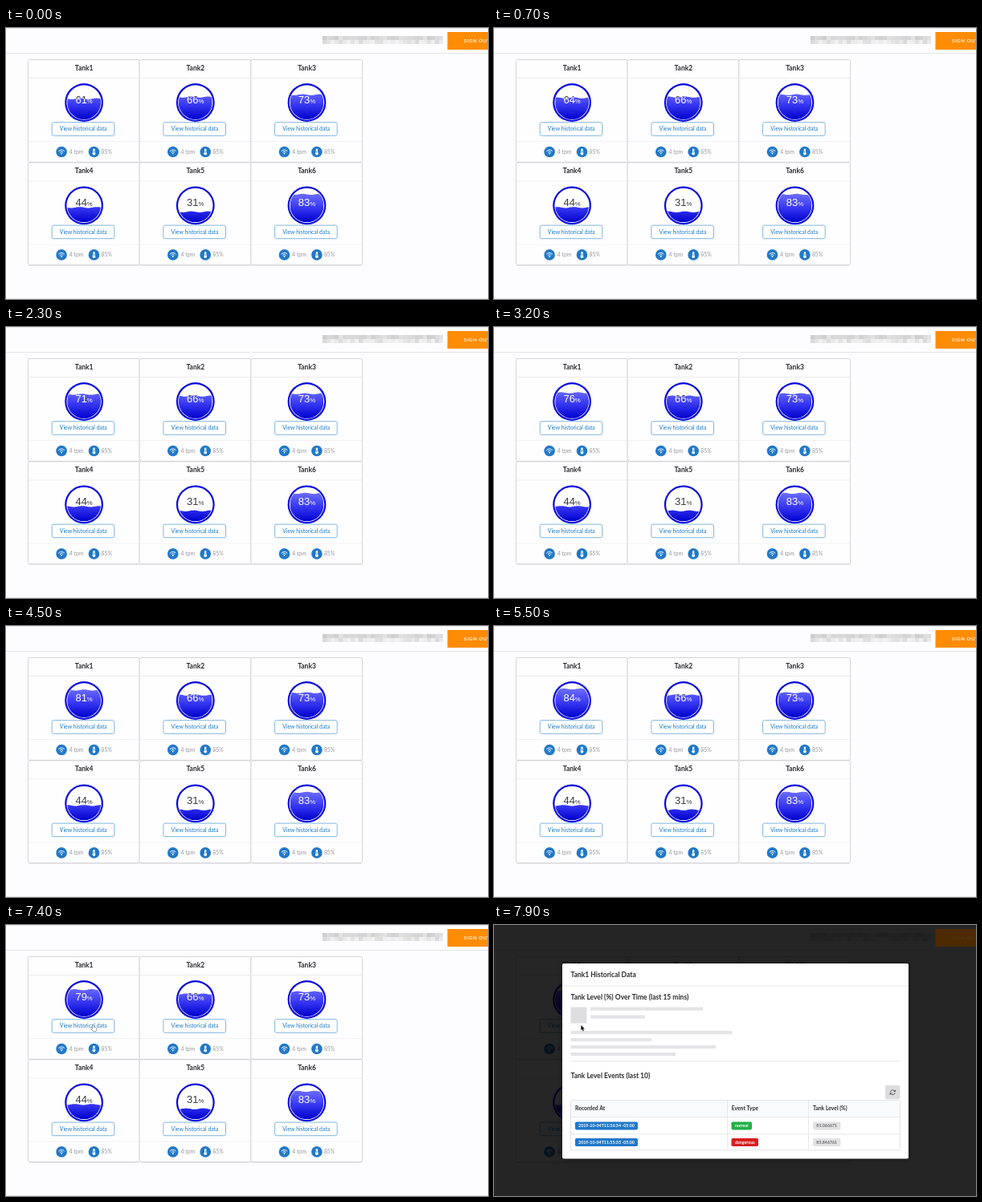
Recreate the animation shown at these times as an HTML page with a canvas. Size 600x338 px, loop 8000 ms.

```html
<!DOCTYPE html>
<html lang="en">
<head>
<meta charset="utf-8">
<title>Tank dashboard</title>
<style>
  html, body { margin: 0; width: 100%; height: 100%; overflow: hidden; background: #fdfcfe; }
  canvas { display: block; width: 600px; height: 338px; }
</style>
</head>
<body>
<canvas id="stage" width="600" height="338"></canvas>
<script>
const ctx = document.getElementById('stage').getContext('2d');
const LOOP = 8000, MODAL_AT = 7600;
const LATO = 'Lato, sans-serif', ARIAL = '"Liberation Sans", Arial, sans-serif';
const BLUE = '#2178c8', RED = '#d81e1e', INK = '#2b2b2d';
const COL = 138.7, ROW = 128.4;

const tanks = [0, 66, 73, 44, 31, 83];
const levelKeys = [[0, 61.3], [1500, 67.3], [3200, 76.2], [4500, 81.2], [6300, 87.3], [6500, 87.2], [7400, 79.3], [8000, 77]];

function track(keys, t) {
  for (let i = 1; i < keys.length; i++) {
    const [t0, a] = keys[i - 1], [t1, b] = keys[i];
    if (t <= t1) return a + (b - a) * Math.max(0, t - t0) / (t1 - t0);
  }
  return keys[keys.length - 1][1];
}

function rect(x, y, w, h, fill) {
  ctx.fillStyle = fill;
  ctx.fillRect(x, y, w, h);
}

function rounded(x, y, w, h, r, fill, stroke, lw = 1) {
  ctx.beginPath();
  ctx.roundRect(x, y, w, h, r);
  if (fill) { ctx.fillStyle = fill; ctx.fill(); }
  if (stroke) { ctx.strokeStyle = stroke; ctx.lineWidth = lw; ctx.stroke(); }
}

function disc(x, y, r, fill) {
  ctx.beginPath();
  ctx.arc(x, y, r, 0, Math.PI * 2);
  ctx.fillStyle = fill;
  ctx.fill();
}

function text(s, x, y, size, color, { weight = 400, align = 'left', family = LATO } = {}) {
  ctx.font = `${weight} ${size}px ${family}`;
  ctx.textAlign = align;
  ctx.textBaseline = 'alphabetic';
  ctx.fillStyle = color;
  ctx.fillText(s, x, y);
}

function percent(v, x, y, color) {
  const num = String(Math.floor(v));
  ctx.font = `13px ${ARIAL}`;
  const w = ctx.measureText(num).width;
  ctx.font = `7.8px ${ARIAL}`;
  const left = x - (w + ctx.measureText('%').width) / 2;
  text(num, left, y, 13, color, { family: ARIAL });
  text('%', left + w, y, 7.8, color, { family: ARIAL });
}

function gauge(x, y, v, danger, t) {
  const r = 21;
  disc(x, y, 23.9, danger ? '#e60d0d' : '#0808dc');
  disc(x, y, 21.7, '#fff');
  percent(v, x, y + 1, '#3c3c42');

  ctx.save();
  ctx.beginPath();
  ctx.arc(x, y, r, 0, Math.PI * 2);
  ctx.clip();
  const level = y + r - 2 * r * v / 100;
  ctx.beginPath();
  ctx.moveTo(x - r, y + r);
  for (let dx = -r; dx <= r; dx++) {
    ctx.lineTo(x + dx, level + 0.65 * Math.sin(2 * Math.PI * (dx / r - t / 2000)));
  }
  ctx.lineTo(x + r, y + r);
  ctx.closePath();
  ctx.clip();
  const g = ctx.createLinearGradient(0, y - r, 0, y + r);
  const stops = danger ? ['#ff8080', '#f83c3c', '#d40808'] : ['#8080ff', '#4040f8', '#0000cd'];
  stops.forEach((c, i) => g.addColorStop(i / 2, c));
  rect(x - r, y - r, 2 * r, 2 * r, g);
  percent(v, x, y + 1, '#fff');
  ctx.restore();
}

function wifi(x, y) {
  disc(x, y, 6.8, BLUE);
  ctx.strokeStyle = '#fff';
  ctx.lineWidth = 1;
  for (const r of [2.6, 4.8]) {
    ctx.beginPath();
    ctx.arc(x, y + 2.3, r, -Math.PI * 0.79, -Math.PI * 0.21);
    ctx.stroke();
  }
  disc(x, y + 2.1, 0.9, '#fff');
}

function thermometer(x, y, danger) {
  disc(x, y, 6.8, danger ? RED : BLUE);
  rounded(x - 1.2, y - 4, 2.4, 6, 1.2, '#fff');
  disc(x, y + 2.1, 1.9, '#fff');
  rect(x - 0.3, y - 1.5, 0.6, 3.2, danger ? RED : BLUE);
}

function card(i, v, t) {
  const x = 27.5 + (i % 3) * COL, y = 39.5 + Math.floor(i / 3) * ROW;
  const cx = x + 69.6, danger = v >= 85;
  rounded(x, y, COL, ROW - 0.4, 2, '#fefdff', '#d6d6da');
  rect(x + 1, y + 22.7, COL - 2, 0.7, '#e6e6ea');
  rect(x + 1, y + 101.7, COL - 2, 0.7, '#ececf0');
  rect(x + 1, y + ROW - 1, COL - 2, 0.8, '#cfcfd4');
  text('Tank' + (i + 1), cx, y + 13.5, 8.5, INK, { weight: 700, align: 'center' });
  gauge(cx, y + 53.5, v, danger, t);
  rounded(x + 29.7, y + 78.2, 77.6, 16.6, 2, '#fff', '#72afde', 0.9);
  text('View historical data', cx - 0.8, y + 88.9, 6.85, '#1678c8', { align: 'center' });
  wifi(x + 41.6, y + 115);
  text('4 tpm', x + 51.3, y + 117.5, 6.85, '#99999d');
  thermometer(x + 82, y + 115, danger);
  text('85%', x + 91, y + 117.5, 6.85, '#99999d');
}

// Mosaic strip hiding the account label
function mosaic() {
  let seed = 11;
  const rand = () => (seed = (seed * 16807) % 2147483647) / 2147483647;
  for (let row = 0; row < 2; row++) {
    for (let x = 394; x < 540; x += 5) {
      const c = Math.round((row ? 218 : 206) + rand() * 24);
      rect(x, 10 + row * 5, 5, 5, `rgb(${c},${c},${c})`);
    }
  }
}

function page(t) {
  rect(0, 0, 600, 338, '#fdfcfe');
  rect(0, 0, 600, 1, '#e8e8ea');
  rect(0, 31, 600, 1, '#e4e4e7');
  rect(0, 337, 600, 1, '#e8e8ea');
  mosaic();
  rect(549.5, 5, 51, 22, '#ff8c05');
  ctx.letterSpacing = '0.6px';
  text('SIGN OUT', 570, 18.2, 6, '#fff', { weight: 700 });
  ctx.letterSpacing = '0px';
  const live = track(levelKeys, t);
  tanks.forEach((v, i) => card(i, i ? v + 0.3 : live, t));
}

function label(s, x, y, w, fill, color = '#fff') {
  rounded(x, y, w, 10, 1.8, fill);
  text(s, x + w / 2, y + 6.9, 5.3, color, { weight: 700, align: 'center' });
}

function refreshIcon(x, y) {
  ctx.strokeStyle = ctx.fillStyle = '#555';
  ctx.lineWidth = 0.9;
  for (const turn of [0, Math.PI]) {
    ctx.save();
    ctx.translate(x, y);
    ctx.rotate(turn);
    ctx.beginPath();
    ctx.arc(0, 0, 2.9, Math.PI * 1.05, Math.PI * 1.8);
    ctx.stroke();
    ctx.beginPath();
    ctx.moveTo(3.6, -3.5);
    ctx.lineTo(3.6, -0.6);
    ctx.lineTo(0.7, -0.6);
    ctx.fill();
    ctx.restore();
  }
}

function modal() {
  rect(0, 0, 600, 338, 'rgba(0,0,0,0.85)');
  rect(549.5, 5, 51, 22, 'rgba(255,140,5,0.18)');
  ctx.save();
  ctx.shadowColor = 'rgba(0,0,0,0.4)';
  ctx.shadowBlur = 6;
  rounded(85, 48, 431, 243.5, 2, '#fff');
  ctx.restore();

  const bold = { weight: 700 };
  text('Tank1 Historical Data', 95.5, 65, 8.5, INK, bold);
  rect(85, 75.7, 431, 0.8, '#dededf');
  text('Tank Level (%) Over Time (last 15 mins)', 95.5, 93.2, 8.5, INK, bold);

  rect(95.5, 102.5, 20, 20, '#dedde0');
  for (const [x, y, w] of [[120, 102.5, 140], [120, 112.5, 68], [95.5, 132, 201], [95.5, 141, 100.5], [95.5, 150, 180.5], [95.5, 159, 130.5]]) {
    rect(x, y, w, 4.2, '#e4e3e6');
  }
  rect(95.5, 169.5, 410, 0.8, '#dededf');
  text('Tank Level Events (last 10)', 95.5, 190.7, 8.5, INK, bold);
  rounded(487, 200, 18.5, 17.3, 2, '#dcdcde');
  refreshIcon(496.3, 208.7);

  rounded(95.5, 218.5, 410, 62.3, 1.5, '#fff', '#dededf', 0.8);
  rect(96, 219, 409, 20.5, '#f9fafb');
  for (const y of [239.3, 260.4]) rect(95.5, y, 410, 0.8, '#e0e0e2');
  for (const x of [290, 391]) rect(x, 218.5, 0.8, 62.3, '#e4e4e6');
  text('Recorded At', 101, 231.3, 6.8, INK, bold);
  text('Event Type', 295.7, 231.3, 6.8, INK, bold);
  text('Tank Level (%)', 397, 231.3, 6.8, INK, bold);

  const rows = [
    ['2019-10-04T11:56:34 -05:00', 'normal', 25.5, '#21b045', '81.066671'],
    ['2019-10-04T11:55:33 -05:00', 'dangerous', 33.5, RED, '85.846761'],
  ];
  rows.forEach(([time, type, w, color, level], i) => {
    const y = 245.4 + i * 20.6;
    label(time, 101, y, 78, BLUE);
    label(type, 295.5, y, w, color);
    label(level, 397, y, 34.5, '#e2e1e3', '#68686b');
  });
}

function shape(x, y, pts, fill, stroke) {
  ctx.beginPath();
  pts.forEach(([px, py]) => ctx.lineTo(x + px, y + py));
  ctx.closePath();
  ctx.lineJoin = 'round';
  ctx.lineWidth = 0.9;
  ctx.strokeStyle = stroke;
  ctx.fillStyle = fill;
  ctx.stroke();
  ctx.fill();
}

const ARROW = [[0, 0], [0, 6.4], [1.5, 5.1], [2.5, 7.4], [3.6, 6.9], [2.6, 4.7], [4.6, 4.6]];
const HAND = [[-0.8, 0], [0.5, 0], [0.9, 2.6], [3.6, 3.3], [4.2, 4.2], [3.6, 7.6], [0.2, 7.6], [-2.4, 4.6], [-1.7, 3.9], [-0.3, 4.8]];

function cursor(t) {
  if (t < 6950) return;
  const p = Math.min(1, (t - 6950) / 350), e = 1 - (1 - p) ** 3;
  const x = 12 + 96.3 * e, y = 150 - 25 * e;
  const onButton = t < MODAL_AT && x > 57 && y < 134.5;
  if (onButton) shape(x, y, HAND, '#fff', '#44444a');
  else shape(x, y, ARROW, '#111', '#fff');
}

function frame(now) {
  const t = now % LOOP;
  page(t);
  if (t >= MODAL_AT) modal();
  cursor(t);
}

const start = performance.now();
function tick() {
  frame(performance.now() - start);
  requestAnimationFrame(tick);
}
tick();
</script>
</body>
</html>
```
